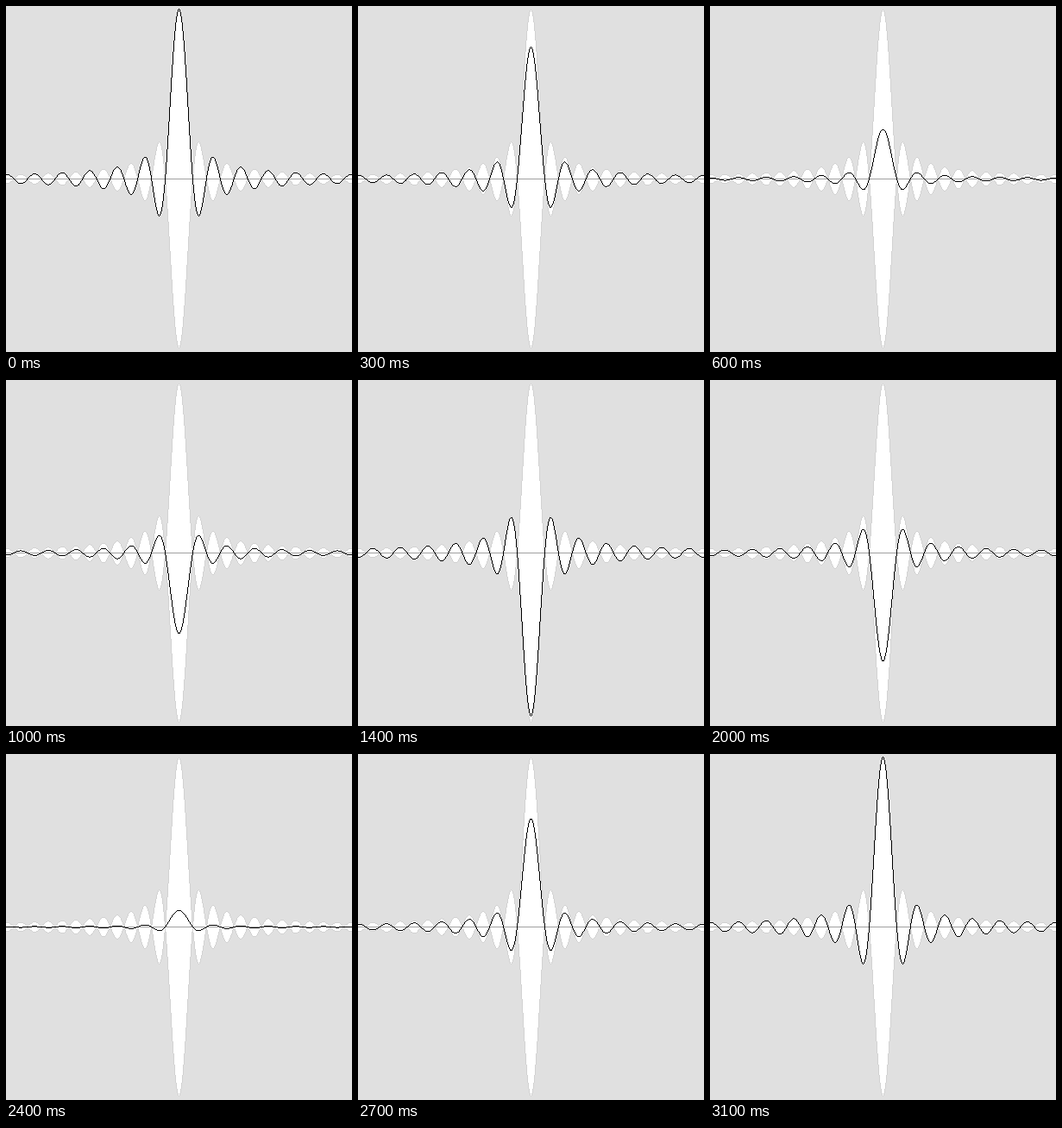
Animation of 401 by 401 pixels, one loop 3.2 s. Source, as a matplotlib script:

```python
import numpy as np
import matplotlib.pyplot as plt
from matplotlib.animation import FuncAnimation

SIZE, MID = 401, 200
FRAMES, INTERVAL = 32, 100
AMPLITUDE, ENVELOPE, LOBE = 197.6, 196.2, 15.95
BACK, FILL, EDGE, AXIS, INK = 224, 255, 210, 160, 0

cols = np.arange(-1, SIZE + 1)
rows = np.arange(SIZE)[:, None]
shape = np.sinc((cols - MID) / LOBE)


def trace(values):
    """Mask of a one-pixel polyline through one value per column."""
    y = MID - np.round(values)
    mids = (y[:-1] + y[1:]) / 2
    left, right, y = mids[:-1], mids[1:], y[1:-1]
    low = np.minimum(np.minimum(left, right), y)
    high = np.maximum(np.maximum(left, right), y)
    return ((rows >= low) & (rows < high)) | (rows == y)


def backdrop():
    wave = ENVELOPE * shape
    img = np.full((SIZE, SIZE), BACK, np.uint8)
    img[np.abs(rows - MID) < np.abs(np.round(wave[1:-1]))] = FILL
    img[trace(wave) | trace(-wave)] = EDGE
    img[MID] = AXIS
    return img


base = backdrop()
fig = plt.figure(figsize=(SIZE / 128, SIZE / 128), dpi=128)
ax = fig.add_axes([0, 0, 1, 1])
ax.axis("off")
picture = ax.imshow(base, cmap="gray", vmin=0, vmax=255,
                    interpolation="nearest", aspect="auto")


def update(i):
    phase = 2 * np.pi * (i + 0.5) / FRAMES
    img = base.copy()
    img[trace(AMPLITUDE * np.cos(phase) * shape)] = INK
    picture.set_data(img)
    return (picture,)


anim = FuncAnimation(fig, update, frames=FRAMES, interval=INTERVAL,
                     repeat=True, repeat_delay=0)
plt.show()
```
